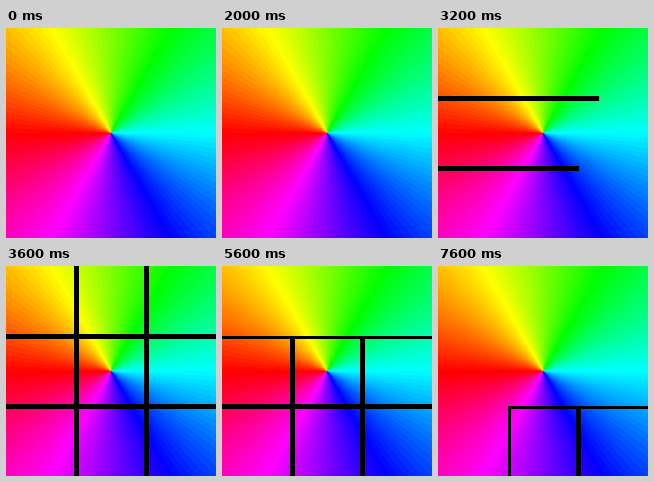
Write an HTML page with a canvas that moves like this. It is 210 px wide and 210 px high and loops after 8 s.

```html
<!DOCTYPE html>
<html lang="en">
<head>
<meta charset="utf-8">
<title>255 Colours</title>
<style>
  html, body { margin: 0; width: 100%; height: 100%; overflow: hidden; }
  canvas { display: block; }
</style>
</head>
<body>
<canvas id="stage" width="210" height="210"></canvas>
<script>
const SIZE = 210, TILE = 70, CENTRE = SIZE / 2;
const LOOP = 8000, LINE_WIDTH = 5, BANDS = 128;
const ctx = document.getElementById('stage').getContext('2d');

function hueWheel(addStops) {
  const wheel = ctx.createConicGradient(Math.PI, CENTRE, CENTRE);
  addStops(wheel);
  return wheel;
}

const smooth = hueWheel(wheel => {
  for (let i = 0; i <= 6; i++) wheel.addColorStop(i / 6, `hsl(${i * 60}, 100%, 50%)`);
});

// A limited palette shows as narrow wedges of flat colour.
const banded = hueWheel(wheel => {
  for (let i = 0; i < BANDS; i++) {
    const colour = `hsl(${(i + 0.5) * 360 / BANDS}, 100%, 50%)`;
    wheel.addColorStop(i / BANDS, colour);
    wheel.addColorStop((i + 1) / BANDS, colour);
  }
});

function drawCaption() {
  ctx.save();
  ctx.font = '900 30px Lato, sans-serif';
  ctx.letterSpacing = '0.6px';
  ctx.fillStyle = '#000';
  ctx.shadowColor = '#fff';
  ctx.shadowBlur = 4;
  ctx.shadowOffsetX = ctx.shadowOffsetY = 2;
  ctx.fillText('255 Colours', 17, 189);
  ctx.restore();
}

function drawGrid(step) {
  const upTo = length => Math.max(0, Math.min(SIZE, length));
  const edge = LINE_WIDTH >> 1;
  const down = upTo((step - 4) * TILE);
  ctx.fillStyle = '#000';
  ctx.fillRect(0, TILE - edge, upTo(step * 53.7), LINE_WIDTH);
  ctx.fillRect(0, 2 * TILE - edge, upTo(step * 47), LINE_WIDTH);
  ctx.fillRect(TILE - edge, 0, LINE_WIDTH, down);
  ctx.fillRect(2 * TILE - edge, 0, LINE_WIDTH, down);
}

function drawTiles(count) {
  ctx.fillStyle = smooth;
  for (let i = 0; i < count; i++) {
    ctx.fillRect(i % 3 * TILE, Math.floor(i / 3) * TILE, TILE, TILE);
  }
}

function render(t) {
  ctx.fillStyle = banded;
  ctx.fillRect(0, 0, SIZE, SIZE);
  if (t >= 1000 && t < 2000) drawCaption();
  if (t >= 3000) drawGrid(Math.min(7, Math.floor((t - 3000) / 100) + 1));
  if (t >= 4600) drawTiles(Math.floor((t - 4600) / 500) + 1);
}

const start = performance.now();
function tick() {
  render((performance.now() - start) % LOOP);
  requestAnimationFrame(tick);
}
tick();
</script>
</body>
</html>
```
